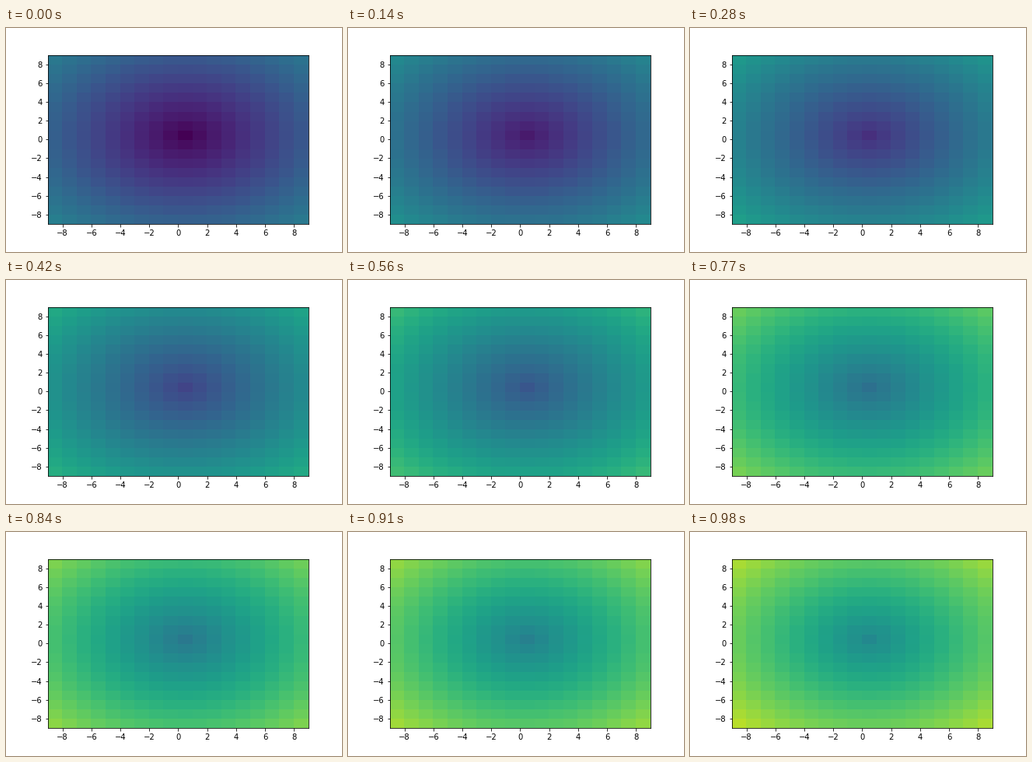
Write a matplotlib script that moves like this. It is 432 px wide and 288 px high and loops after 1050 ms.

```python
import numpy as np
import matplotlib.pyplot as plt
from matplotlib.animation import FuncAnimation

FRAMES = 15
INTERVAL = 70  # ms

plt.rcParams["font.family"] = "DejaVu Sans"
plt.rcParams["font.size"] = 10

edges = np.arange(-9, 10)
# Each cell takes the distance of its lower-left corner from the origin.
base = np.hypot(edges[:-1], edges[:-1, None])

fig = plt.figure(figsize=(6, 4), dpi=72, facecolor="white")
ax = fig.add_axes([0.125, 0.125, 0.775, 0.755])
cells = ax.pcolor(edges, edges, base, cmap="viridis",
                  norm=plt.Normalize(0, 30))
ticks = np.arange(-8, 9, 2)
ax.set(xlim=(-9, 9), ylim=(-9, 9), xticks=ticks, yticks=ticks)


def update(step):
    cells.set_array(base + step)
    return (cells,)


anim = FuncAnimation(fig, update, frames=FRAMES, interval=INTERVAL,
                     init_func=lambda: update(0), repeat=True,
                     repeat_delay=0, blit=False)

plt.show()
```
